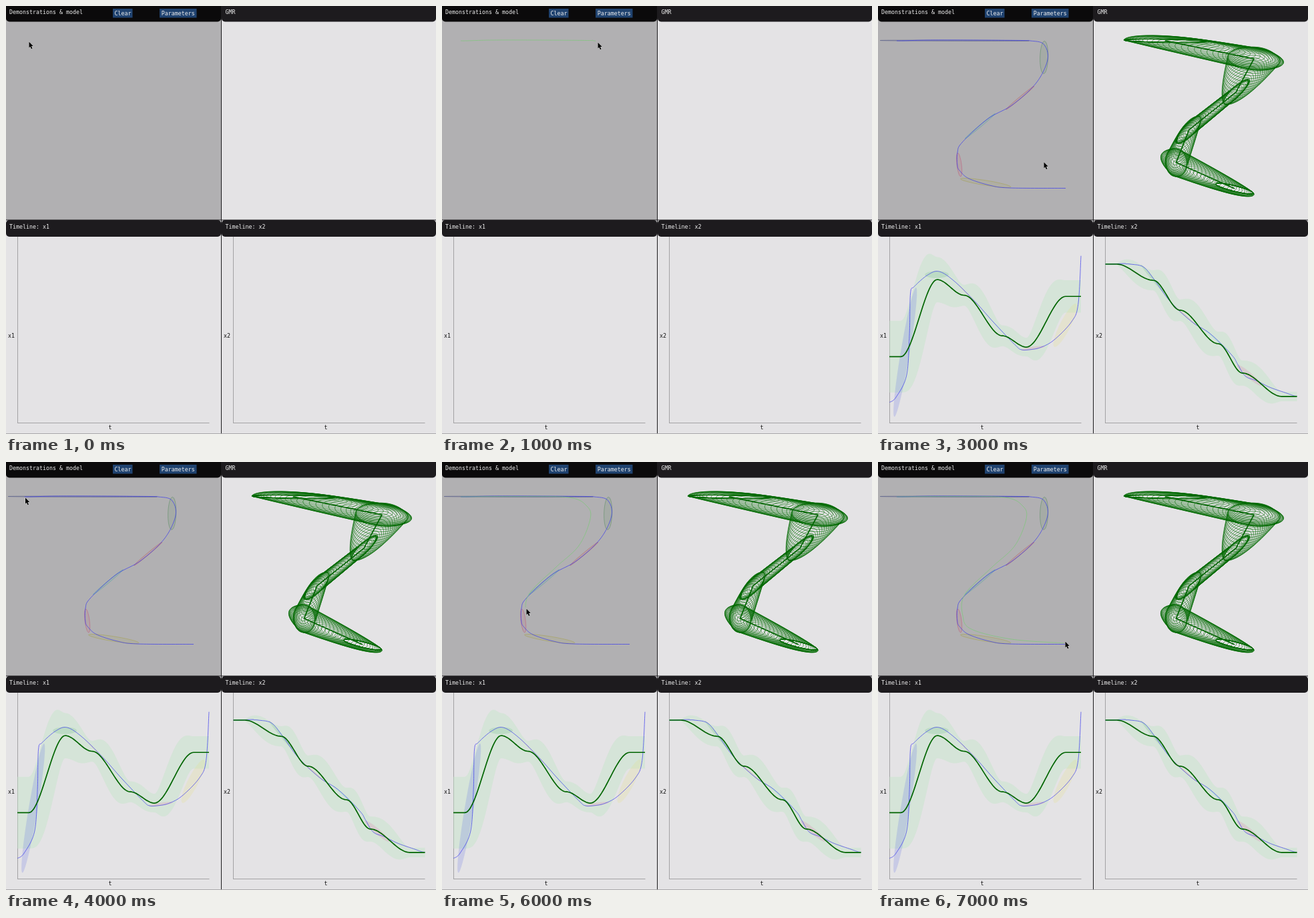
These frames come from a looping animation (644x640 px, 8 s). An HTML page with a canvas:

```html
<!DOCTYPE html>
<html lang="en">
<head>
<meta charset="utf-8">
<title>GMR demo</title>
<style>
html, body { margin: 0; width: 100%; height: 100%; overflow: hidden; background: #e4e3e5; }
canvas { display: block; }
</style>
</head>
<body>
<canvas id="stage" width="644" height="640"></canvas>
<script>
const ctx = document.getElementById('stage').getContext('2d');
const GREEN = '#006400', BLUE = 'rgba(52,52,238,.85)';
const SAMPLES = 16;

// Key points of the demonstrations: time, x, y.
const firstDemo = spline([[0,28,52], [.035,37,52], [.09,75,51], [.105,147,51], [.11,216,51.5], [.13,228,52],
  [.2,248,57], [.26,254,80], [.34,237,115], [.45,201,148], [.55,164,169], [.66,126,204], [.69,119,219],
  [.73,119,239], [.79,123,247], [.86,136,258], [.95,167,268], [.985,197,272], [1,281,272.5]]);
const secondDemo = spline([[0,28,52], [.1,110,51.5], [.2,190,53], [.25,217,66], [.3,222,85], [.4,205,125],
  [.5,170,158], [.6,130,198], [.7,127,230], [.8,140,250], [.9,200,265], [1,281,271]]);

// Regression states: mean, half extents and correlation.
const states = [
  { t: .06, x: 107, y: 52, w: 62, h: 2.5, r: .4 },
  { t: .25, x: 240, y: 79, w: 39, h: 17, r: .2 },
  { t: .39, x: 213, y: 129, w: 18, h: 18, r: -.85 },
  { t: .59, x: 143, y: 185, w: 18, h: 20, r: -.8 },
  { t: .715, x: 123.5, y: 234, w: 16, h: 21, r: .1 },
  { t: .92, x: 211, y: 273, w: 28, h: 8, r: .85 }
];
const stateColors = ['80,95,225', '80,180,110', '235,90,80', '80,205,205', '220,100,160', '225,220,110'];
const edgeColors = ['50,60,120', '60,130,70', '190,60,70', '50,160,160', '200,60,100', '160,155,40'];

// Projections of (time, x, y) into the panels.
const toPlane = ([, x, y]) => [x, y];
const toX1 = ([t, x]) => [17 + 287 * t, 617 - .866 * x];
const toX2 = ([t, , y]) => [340.5 + 287 * t, 386 + .895 * (y - 52)];

// One entry per second: cursor x, y, drawn key points of both demos, model visible.
const steps = [[34,53,0,0,0], [233,54,5.2,0,0], [122,247,13,0,0], [248,233,0,0,1],
  [28.5,53,0,0,1], [223,84,0,4,1], [126,219,0,7.6,1], [280,268,0,11,1]];

// Catmull-Rom samples through the key points.
function spline(keys) {
  const last = keys.length - 1;
  return Array.from({ length: last * SAMPLES + 1 }, (_, n) => {
    const i = Math.min(Math.floor(n / SAMPLES), last - 1), f = n / SAMPLES - i;
    return keys[0].map((_, k) => {
      const [a, b, c, d] = [-1, 0, 1, 2].map(o => keys[Math.max(0, Math.min(last, i + o))][k]);
      return b + f / 2 * (c - a + f * (2 * a - 5 * b + 4 * c - d + f * (3 * (b - c) + d - a)));
    });
  });
}

function toOval(x, y, xx, xy, yy) {
  const w = Math.sqrt(xx), h = Math.sqrt(yy);
  return { x, y, w, h, r: xy / (w * h) };
}

// Mixture mean and covariance of the two states around time t.
function regress(t) {
  const next = states.findIndex(s => s.t > t);
  const b = states.at(next), a = states[Math.max(0, next < 0 ? states.length - 1 : next - 1)];
  const f = a === b ? 0 : (t - a.t) / (b.t - a.t), g = f * f * (3 - 2 * f);
  const mix = get => get(a) + g * (get(b) - get(a));
  const dx = b.x - a.x, dy = b.y - a.y, spread = g * (1 - g);
  return toOval(mix(s => s.x), mix(s => s.y), mix(s => s.w ** 2) + spread * dx * dx,
    mix(s => s.r * s.w * s.h) + spread * dx * dy, mix(s => s.h ** 2) + spread * dy * dy);
}

const times = Array.from({ length: 151 }, (_, i) => i / 150);
const regression = times.map(regress);

// Gaussian of one sixth of the demonstration, weighted by time.
function fit(part, project) {
  let n = 0, sx = 0, sy = 0, sxx = 0, sxy = 0, syy = 0;
  firstDemo.slice(1).forEach((p, i) => {
    if (Math.min(5, Math.floor(p[0] * 6)) !== part) return;
    const [x, y] = project(p), m = p[0] - firstDemo[i][0];
    n += m; sx += m * x; sy += m * y;
    sxx += m * x * x; sxy += m * x * y; syy += m * y * y;
  });
  const x = sx / n, y = sy / n, k = 1.3 ** 2;
  return toOval(x, y, k * (sxx / n - x * x), k * (sxy / n - x * y), k * (syy / n - y * y));
}

function trace(points) {
  ctx.beginPath();
  points.forEach(p => ctx.lineTo(...p));
}

function traceOval({ x, y, w, h, r }) {
  const shift = Math.acos(Math.max(-1, Math.min(1, r)));
  ctx.beginPath();
  for (let a = 0; a < 2 * Math.PI; a += Math.PI / 30) ctx.lineTo(x + w * Math.cos(a), y + h * Math.cos(a - shift));
  ctx.closePath();
}

function stroke(color, width) {
  ctx.strokeStyle = color;
  ctx.lineWidth = width;
  ctx.stroke();
}

function fill(color) {
  ctx.fillStyle = color;
  ctx.fill();
}

function rect(color, x, y, w, h, r = 0) {
  ctx.beginPath();
  ctx.roundRect(x, y, w, h, r);
  fill(color);
}

function text(label, x, y, color = '#f0f0f0') {
  ctx.fillStyle = color;
  ctx.fillText(label, x, y);
}

function drawPlane() {
  edgeColors.forEach((rgb, i) => {
    traceOval(fit(i, toPlane));
    fill(`rgba(${rgb},.1)`);
    stroke(`rgba(${rgb},.55)`, .7);
  });
  trace(firstDemo.map(toPlane));
  stroke(BLUE, .8);
}

function drawTimeline(project) {
  const edge = side => regression.map((s, i) => project([times[i], s.x + side * s.w, s.y + side * s.h]));
  trace([...edge(1), ...edge(-1).reverse()]);
  fill('rgba(190,228,194,.4)');
  stateColors.forEach((rgb, i) => {
    traceOval(fit(i, project));
    fill(`rgba(${rgb},.19)`);
  });
  trace(firstDemo.map(project));
  stroke(BLUE, .8);
  trace(edge(0));
  stroke(GREEN, 1.7);
}

function drawRegression() {
  ctx.save();
  ctx.translate(323, 0);
  regression.forEach(s => {
    traceOval(s);
    stroke('rgba(0,105,0,.85)', .7);
  });
  trace(regression.map(s => [s.x, s.y]));
  stroke(GREEN, 1.7);
  ctx.restore();
}

function drawPanels() {
  rect('#e4e3e5', 0, 0, 644, 640);
  rect('#b1b0b2', 0, 0, 322, 320);
  rect('#1d1b1e', 322, 0, 1, 640);
  rect('#1d1b1e', 0, 319.5, 644, 1);
  rect('#aaa9ab', 0, 639, 644, 1);
  rect('#0b0a0b', 0, 0, 322, 23.5, [0, 0, 5, 5]);
  rect('#1d1b1e', 323, 0, 321, 23.5, [0, 0, 5, 5]);
  rect('#1d1b1e', 0, 320, 322, 25, 5);
  rect('#1d1b1e', 323, 320, 321, 25, 5);
  rect('#204370', 160, 4, 29.5, 13.5);
  rect('#204370', 230, 4, 55.5, 13.5);
  ctx.font = '8.3px "DejaVu Sans Mono", monospace';
  text('Demonstrations & model', 5, 11.5);
  text('Clear', 162.5, 14);
  text('Parameters', 232.8, 14);
  text('GMR', 328.5, 11.5);
  text('Timeline: x1', 5, 333);
  text('Timeline: x2', 328.5, 333);
  [17, 340].forEach((left, i) => {
    rect('#a3a2a4', left, 345, 1, 279);
    rect('#a3a2a4', left, 623, 287.5, 1);
    text('x' + (i + 1), left - 14, 495.5, '#111');
    text('t', left + 136.5, 633, '#111');
  });
}

function drawCursor(x, y) {
  ctx.save();
  ctx.translate(x, y);
  trace([[.5, .5], [.5, 9.5], [2.4, 7.7], [4, 11.2], [5.5, 10.5], [4, 7], [6.8, 7]]);
  ctx.closePath();
  stroke('#ddd', 1);
  fill('#000');
  ctx.restore();
}

function draw([x, y, first, second, model]) {
  drawPanels();
  if (model) {
    drawPlane();
    drawRegression();
    drawTimeline(toX1);
    drawTimeline(toX2);
  }
  [[firstDemo, first], [secondDemo, second]].forEach(([demo, keys]) => {
    trace(demo.slice(0, Math.round(keys * SAMPLES)).map(toPlane));
    stroke('rgba(115,205,110,.75)', .8);
  });
  drawCursor(x, y);
}

let shown = -1;
const start = performance.now();
function tick() {
  const step = Math.floor((performance.now() - start) / 1000) % steps.length;
  if (step !== shown) draw(steps[shown = step]);
  requestAnimationFrame(tick);
}
tick();
</script>
</body>
</html>
```
